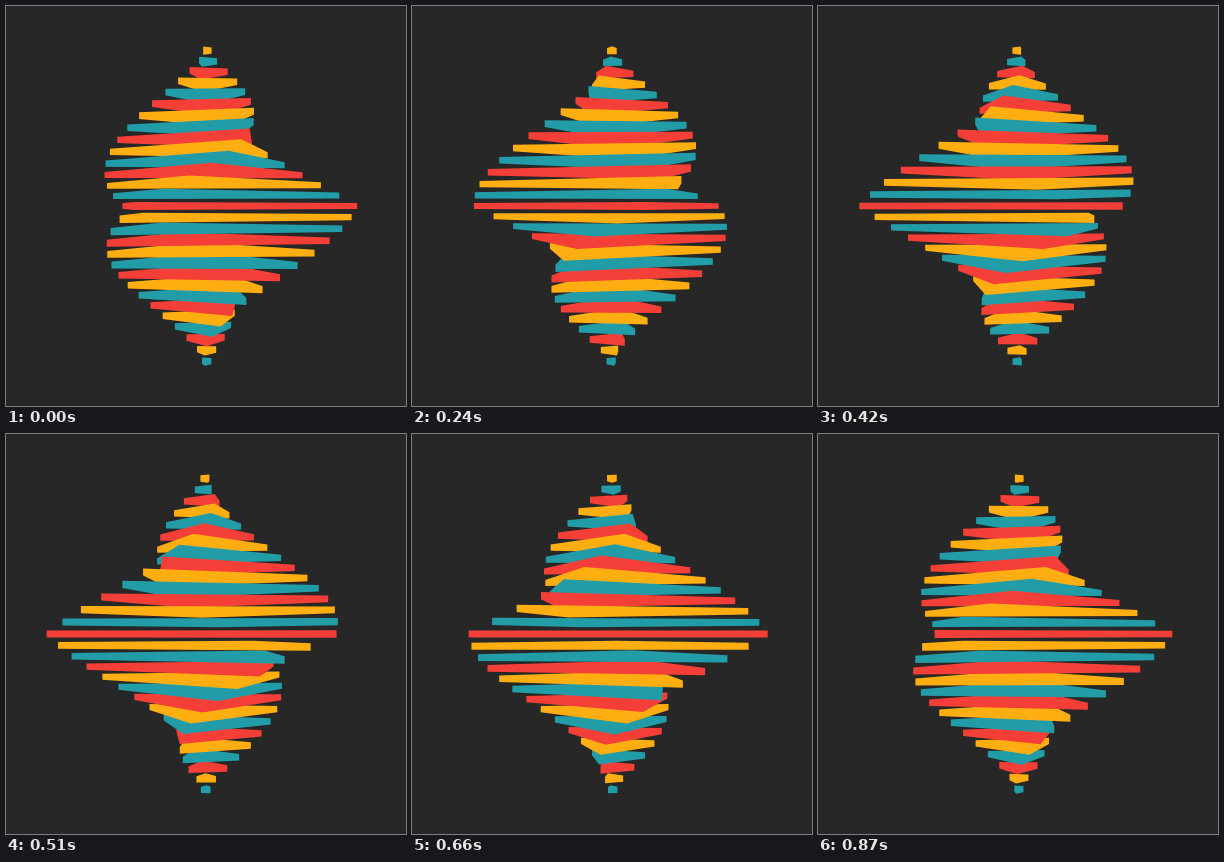
Recreate the animation shown at these times as an HTML page with a canvas. Size 400 by 400 pixels, loop 900 ms.

```html
<!DOCTYPE html>
<html lang="en">
<head>
<meta charset="utf-8">
<title>Twisting triangles</title>
<style>
  html, body { margin: 0; width: 100%; height: 100%; overflow: hidden; background: #272727; }
  canvas { display: block; width: 400px; height: 400px; }
</style>
</head>
<body>
<canvas id="stage" width="400" height="400"></canvas>
<script>
const ctx = document.getElementById('stage').getContext('2d');
const COLORS = ['#ffae12', '#229ca7', '#f33f37'];
const HALF = 14;          // slabs above and below the middle one
const GAP = 11.1;         // vertical spacing
const THICK = 6.4;
const GROW = 11.2;        // radius gained per slab towards the middle
const CAMERA = 800;
const TWIST = 8;          // degrees between neighbouring slabs
const STEP = 30, STEPS = 30;

function project(x, y, z) {
  const s = CAMERA / (CAMERA - z);
  return [200 + x * s, 200 + y * s];
}

const cross = (o, a, b) => (a[0] - o[0]) * (b[1] - o[1]) - (a[1] - o[1]) * (b[0] - o[0]);

function halfHull(points) {
  const hull = [];
  for (const p of points) {
    while (hull.length > 1 && cross(hull.at(-2), hull.at(-1), p) <= 0) hull.pop();
    hull.push(p);
  }
  return hull.slice(0, -1);
}

function convexHull(points) {
  points.sort((a, b) => a[0] - b[0] || a[1] - b[1]);
  return [...halfHull(points), ...halfHull([...points].reverse())];
}

// Silhouette of a triangular prism, counted from the middle slab
function drawSlab(level, spin) {
  const radius = GROW * Math.max(0.5, HALF - Math.abs(level));
  const points = [];
  for (let k = 0; k < 3; k++) {
    const a = (TWIST * (level - 1) - spin + 120 * k) * Math.PI / 180;
    for (const side of [-0.5, 0.5]) {
      points.push(project(radius * Math.cos(a), level * GAP + side * THICK, radius * Math.sin(a)));
    }
  }
  ctx.fillStyle = COLORS[(level + HALF) % 3];
  ctx.beginPath();
  for (const [x, y] of convexHull(points)) ctx.lineTo(x, y);
  ctx.fill();
}

function draw(now) {
  const spin = Math.floor(now / STEP) % STEPS * 120 / STEPS;
  ctx.fillStyle = '#272727';
  ctx.fillRect(0, 0, 400, 400);
  // The camera is level with the middle, so inner slabs cover outer ones
  for (let n = HALF; n > 0; n--) {
    drawSlab(-n, spin);
    drawSlab(n, spin);
  }
  drawSlab(0, spin);
}

const start = performance.now();
function tick() {
  draw(performance.now() - start);
  requestAnimationFrame(tick);
}
tick();
</script>
</body>
</html>
```
